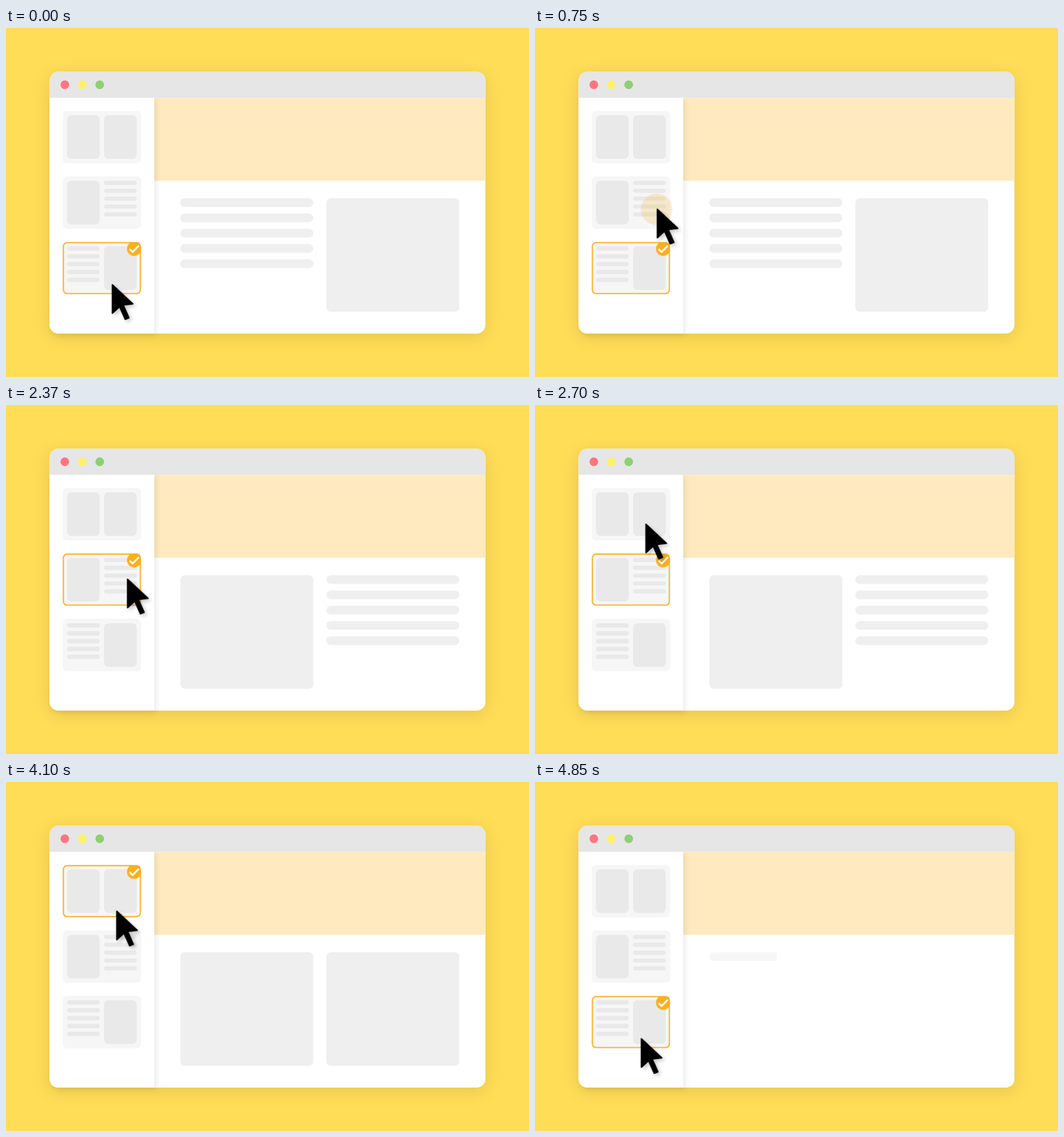
Animation of 917x611 px, one loop 6580 ms. Source, as an HTML page:

```html
<!DOCTYPE html>
<html lang="en">
<head>
<meta charset="utf-8">
<title>Layout picker</title>
<style>
  html, body { margin: 0; width: 100%; height: 100%; overflow: hidden; background: #ffdd57; }
  svg { display: block; width: 917px; height: 611px; }
  .window { fill: #fff; filter: drop-shadow(0 8px 18px rgba(0, 0, 0, .1)); }
  .sidebar { fill: #fff; filter: drop-shadow(4px 4px 6px rgba(0, 0, 0, .09)); }
  .card { fill: #f6f6f6; }
  .thumb { fill: #e9e9e9; }
  .block { fill: #efefef; }
  .frame { fill: none; stroke: #f6b021; stroke-width: 3; }
  .badge { fill: #f6b021; }
  .tick { fill: none; stroke: #fff; stroke-width: 4; }
  .ring { fill: #f6b021; }
  .arrow { stroke: #000; stroke-width: 3; stroke-linejoin: round; filter: drop-shadow(5px 5px 4px rgba(0, 0, 0, .2)); }
</style>
</head>
<body>
<svg viewBox="0 0 1200 799.56" preserveAspectRatio="xMinYMin">
  <clipPath id="cardClip"><rect width="180" height="120" rx="10"/></clipPath>
  <rect class="window" x="100" y="100" width="1000" height="600" rx="20"/>
  <rect x="340" y="160" width="760" height="190" fill="#ffe9be"/>
  <g id="page"></g>
  <path class="sidebar" d="M100 160H340V700H120A20 20 0 0 1 100 680Z"/>
  <path d="M100 160V120A20 20 0 0 1 120 100H1080A20 20 0 0 1 1100 120V160Z" fill="#e6e6e6"/>
  <circle cx="135" cy="130" r="10" fill="#ff7680"/>
  <circle cx="175" cy="130" r="10" fill="#fff06a"/>
  <circle cx="215" cy="130" r="10" fill="#8fd073"/>
  <g id="cards"></g>
  <g id="cursor">
    <circle id="ring" class="ring" cx=".5" cy="3" r="36"/>
    <path class="arrow" d="M2 2.6 49 46.5 27 49 40 78.5 31.5 82 18.5 53 2 68Z"/>
  </g>
</svg>
<script>
const LOOP = 6580;
const $ = id => document.getElementById(id);
const sheet = document.head.appendChild(document.createElement('style'));
let count = 0;

function add(parent, tag, attrs) {
  const el = document.createElementNS('http://www.w3.org/2000/svg', tag);
  for (const key in attrs) el.setAttribute(key, attrs[key]);
  return parent.appendChild(el);
}

// rows: [time in ms, declarations]
function animate(el, rows) {
  const name = 'k' + count++;
  const steps = rows.map(([ms, css]) => `${(ms / LOOP * 100).toFixed(4)}% { ${css} }`);
  sheet.append(`@keyframes ${name} { ${steps.join(' ')} }\n`);
  el.style.animation = `${name} ${LOOP}ms linear infinite`;
}

// Cells of a layout: 'I' is an image, 'T' a column of five lines.
function cells(layout, xs, y, w, h, lineH, gap) {
  return [...layout].flatMap((kind, i) => kind === 'I'
    ? [{ x: xs[i], y, width: w, height: h, rx: 10 }]
    : Array.from({ length: 5 }, (_, n) =>
        ({ x: xs[i], y: y + n * gap, width: w, height: lineH, rx: lineH / 2 })));
}

const FADE = 160;
const layouts = [
  { cells: 'II', on: 2850, off: 4690, show: 3010, hide: 4570 },
  { cells: 'IT', on: 870, off: 2850, show: 950, hide: 2820 },
  { cells: 'TI', on: 4690, off: 870, show: 4750, hide: 760 }
];

function wipe(el, start, length, hide) {
  const shown = 'opacity: 1; clip-path: inset(0 0 0 0)';
  const gone = 'opacity: 0; clip-path: inset(0 0 0 0)';
  const closed = 'opacity: 0; clip-path: inset(0 100% 0 0)';
  const enter = [[start, closed], [start + length, shown]];
  const leave = [[hide, shown], [hide + 30, gone]];
  animate(el, hide > start
    ? [[0, closed], ...enter, ...leave, [LOOP, closed]]
    : [[0, shown], ...leave, ...enter, [LOOP, shown]]);
}

function crossfade(el, on, off) {
  const enter = [[on, 'opacity: 0'], [on + FADE, 'opacity: 1']];
  const leave = [[off, 'opacity: 1'], [off + FADE, 'opacity: 0']];
  const edge = `opacity: ${off > on ? 0 : 1}`;
  const middle = off > on ? [...enter, ...leave] : [...leave, ...enter];
  animate(el, [[0, edge], ...middle, [LOOP, edge]]);
}

layouts.forEach((layout, i) => {
  const card = add($('cards'), 'g', { transform: `translate(130 ${190 + i * 150})` });
  add(card, 'rect', { class: 'card', width: 180, height: 120, rx: 10 });
  for (const box of cells(layout.cells, [10, 95], 10, 75, 100, 10, 18))
    add(card, 'rect', { class: 'thumb', ...box });

  const mark = add(card, 'g', { 'clip-path': 'url(#cardClip)' });
  add(mark, 'rect', { class: 'frame', x: 1.5, y: 1.5, width: 177, height: 117, rx: 8.5 });
  add(mark, 'circle', { class: 'badge', cx: 164, cy: 15.5, r: 16.5 });
  add(mark, 'path', { class: 'tick', d: 'M153.5 16.5 160.5 23 175 8.5' });
  crossfade(mark, layout.on, layout.off);

  let start = layout.show;
  for (const box of cells(layout.cells, [400, 735], 390, 305, 260, 20, 35)) {
    const image = box.height > 20;
    wipe(add($('page'), 'rect', { class: 'block', ...box }), start, image ? 400 : 200, layout.hide);
    start += image ? 200 : 100;
  }
});

// Each move leaves with a small jump and then eases out.
const moves = [
  { at: 300, from: [242, 585.5], jump: [245.7, 568], to: [278.7, 412.5] },
  { at: 2370, from: [278.7, 412.5], jump: [277, 397], to: [252.5, 270] },
  { at: 4100, from: [252.5, 270], jump: [252.2, 292], to: [242, 585.5] }
];
const place = ([x, y]) => `transform: translate(${x}px, ${y}px)`;
const easeOut = '; animation-timing-function: cubic-bezier(.185, .288, .294, 1)';

animate($('cursor'), [
  [0, place(moves[0].from)],
  ...moves.flatMap(m => [
    [m.at - 1, place(m.from)],
    [m.at, place(m.jump) + easeOut],
    [m.at + 360, place(m.to)]
  ]),
  [LOOP, place(moves[2].to)]
]);

const ring = (scale, opacity) => `transform: scale(${scale}); opacity: ${opacity}`;
animate($('ring'), [
  [0, ring(0, 0)],
  ...moves.flatMap(m => [
    [m.at + 370, ring(0, .2)],
    [m.at + 445, ring(1, .2)],
    [m.at + 515, ring(1, .2)],
    [m.at + 630, ring(1, 0)],
    [m.at + 631, ring(0, 0)]
  ]),
  [LOOP, ring(0, 0)]
]);
</script>
</body>
</html>
```
